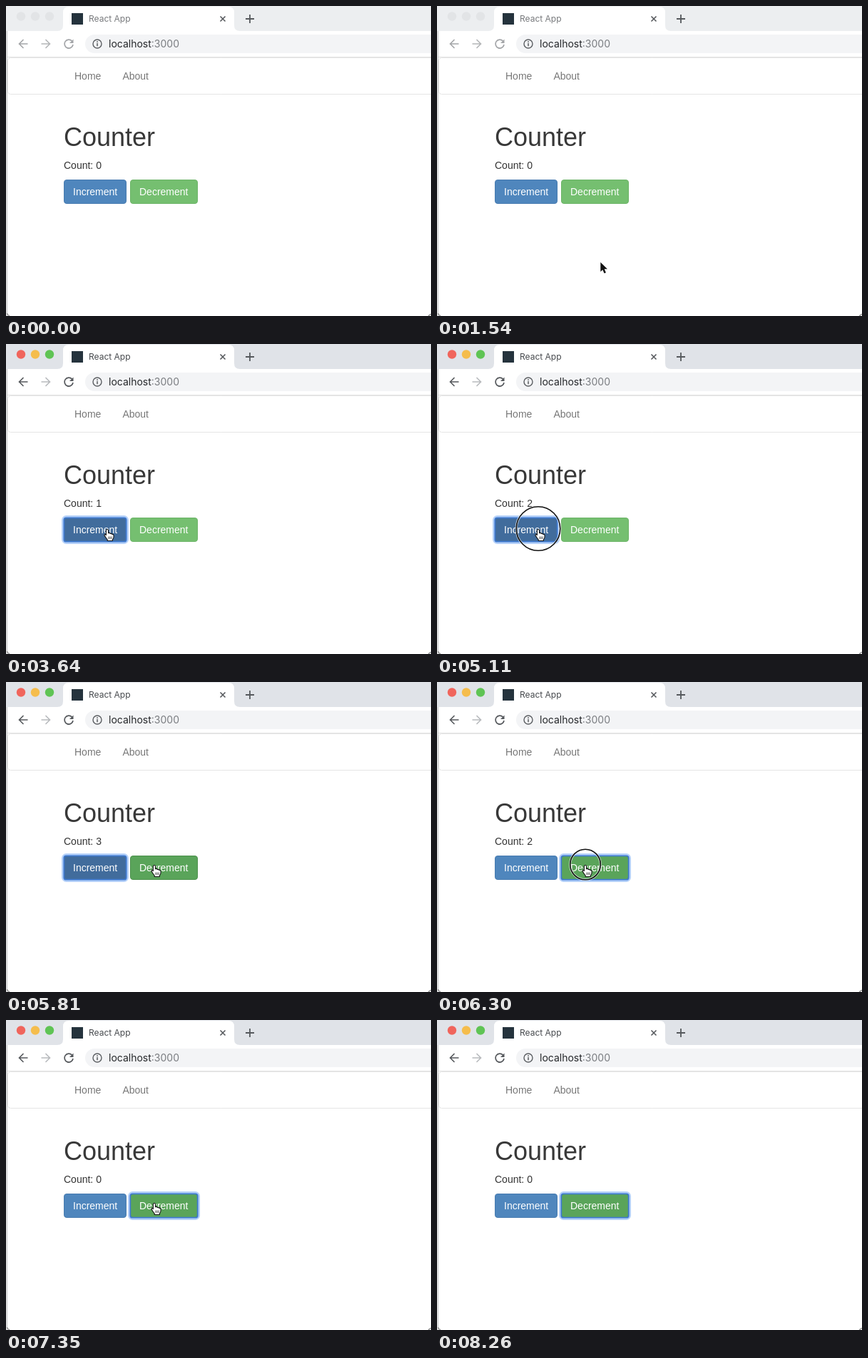
Recreate the animation shown at these times as an HTML page with a canvas. Size 596 px wide and 434 px high, loop 8.4 s.

```html
<!DOCTYPE html>
<html lang="en">
<head>
<meta charset="utf-8">
<title>Counter</title>
<style>
html, body { margin: 0; width: 100%; height: 100%; overflow: hidden; background: #fff; }
canvas { display: block; }
</style>
</head>
<body>
<canvas id="stage" width="596" height="434"></canvas>
<script>
const ctx = document.getElementById('stage').getContext('2d');
const LOOP = 8400, STEP = 70;
const UI = 'Inter, Roboto, sans-serif';
const PAGE = '"Liberation Sans", Arial, sans-serif';
const ACTIVATE = 2660;

// press and release times, and how each click changes the count
const clicks = [
  { down: 2660, up: 2800, add: 0 },
  { down: 3220, up: 3570, add: 1, on: 'inc' },
  { down: 4130, up: 4480, add: 1, on: 'inc' },
  { down: 5040, up: 5320, add: 1, on: 'inc' },
  { down: 5880, up: 6300, add: -1, on: 'dec' },
  { down: 6440, up: 6580, add: -1, on: 'dec' },
  { down: 6860, up: 7140, add: -1, on: 'dec' }
];

// pointer path: time, x, y
const track = [
  [1120, 286, 424], [2100, 142, 258.5], [5390, 142, 258.5], [5810, 208, 255.5],
  [7560, 208, 255.5], [7980, 265, 345], [8050, 265, 345], [8260, 287, 436]
];

const buttons = {
  inc: { x: 81, w: 88, label: 'Increment', base: '#4f86bd', edge: '#477bb0', dark: '#416c9c', darkEdge: '#365d8b' },
  dec: { x: 174, w: 95, label: 'Decrement', base: '#75bf70', edge: '#6bb466', dark: '#5aa45a', darkEdge: '#4b904b' }
};

const ease = u => u * u * (3 - 2 * u);

function pointer(t) {
  if (t < track[0][0] || t >= 8260) return null;
  const i = track.findIndex(k => k[0] > t);
  const [t0, x0, y0] = track[i - 1], [t1, x1, y1] = track[i];
  const u = ease((t - t0) / (t1 - t0));
  return { x: x0 + (x1 - x0) * u, y: y0 + (y1 - y0) * u };
}

function ringRadius(t) {
  const c = clicks.find(c => t >= c.down && t < c.up + STEP);
  if (!c) return 0;
  return t < c.down + STEP || t >= c.up ? 21.3 : 30.8;
}

function box(x, y, w, h, r, fill, stroke, lw = 1) {
  ctx.beginPath();
  ctx.roundRect(x, y, w, h, r);
  if (fill) { ctx.fillStyle = fill; ctx.fill(); }
  if (stroke) { ctx.strokeStyle = stroke; ctx.lineWidth = lw; ctx.stroke(); }
}

function disc(x, y, r, fill) {
  ctx.beginPath();
  ctx.arc(x, y, r, 0, 7);
  ctx.fillStyle = fill;
  ctx.fill();
}

function text(str, x, y, size, color, family = PAGE) {
  ctx.font = size + 'px ' + family;
  ctx.fillStyle = color;
  ctx.fillText(str, x, y);
}

function line(d, color, lw) {
  ctx.strokeStyle = color;
  ctx.lineWidth = lw;
  ctx.stroke(new Path2D(d));
}

function drawBrowser(active) {
  const strip = active ? '#e0e3e8' : '#eceef0';
  const icon = active ? '#55585c' : '#a3a5a8';
  ctx.fillStyle = '#fff';
  ctx.fillRect(0, 0, 596, 434);
  ctx.fillStyle = strip;
  ctx.fillRect(0, 0, 596, 35);
  const lights = active ? ['#f0655c', '#f5bd4c', '#5fc454'] : ['#e2e4e6', '#e2e4e6', '#e2e4e6'];
  lights.forEach((c, i) => disc(21 + 20 * i, 14.5, 6.2, c));

  ctx.fillStyle = '#fff';
  ctx.fill(new Path2D('M72 35Q80 35 80 27V9Q80 1 88 1H312Q320 1 320 9V27Q320 35 328 35Z'));
  ctx.fillStyle = '#25333d';
  ctx.fillRect(92, 10, 16, 16);
  text('React App', 116, 22, 12, active ? '#46494d' : '#77797c', UI);
  line('M300.5 14.5l7 7m0-7l-7 7', '#56595d', 1.6);
  line('M336 18h12m-6-6v12', '#56595d', 1.8);

  line('M30.5 53h-12m6-6l-6 6l6 6', icon, 1.6);
  line('M49.5 53h12m-6-6l6 6l-6 6', active ? '#b8babd' : '#b4b6b8', 1.6);
  line('M92.5 49A6 6 0 1 0 94 54', icon, 1.7);
  ctx.fillStyle = icon;
  ctx.fill(new Path2D('M94.5 46.5V52H89Z'));

  box(111, 40, 510, 26, 13, '#f3f4f6');
  ctx.beginPath();
  ctx.arc(128, 53, 6, 0, 7);
  ctx.strokeStyle = '#5b5e62';
  ctx.lineWidth = 1.4;
  ctx.stroke();
  line('M128 52v4.2M128 49.3v1.6', '#5b5e62', 1.5);
  text('localhost', 144, 58, 14, '#25272a', UI);
  text(':3000', 144 + ctx.measureText('localhost').width, 58, 14, '#7a7d81', UI);
}

function drawPage(count) {
  ctx.fillStyle = '#e2e2e2';
  ctx.fillRect(2, 71, 594, 1);
  box(2.5, 72.5, 620, 51, 4, null, '#e5e5e5');
  text('Home', 96, 103, 14, '#777');
  text('About', 163.4, 103, 14, '#777');
  text('Counter', 81, 196, 36, '#383838');
  text('Count: ' + count, 81, 228, 14, '#333');
}

function drawButton(b, dark, focus) {
  const { x, w } = b;
  if (focus) {
    box(x - 0.5, 242.5, w + 1, 35, 4, null, 'rgba(120,172,245,.55)', 5);
  }
  box(x + 0.5, 243.5, w - 1, 33, 3.5, dark ? b.dark : b.base, dark ? b.darkEdge : b.edge);
  if (focus) box(x + 0.3, 243.3, w - 0.6, 33.4, 3, null, '#3f7ad0', 1.8);
  text(b.label, x + 13, 265, 14, '#fff');
}

function drawFrame() {
  ctx.fillStyle = '#e9e9ea';
  ctx.fillRect(0, 35, 1, 399);
  ctx.fillStyle = '#c6c7c9';
  ctx.fillRect(1, 35, 1, 399);
  line('M1.5 430Q1.8 433 5 433.5', '#8b8b8b', 1.2);
  line('M595.5 431Q595 433 592 433.5', '#8b8b8b', 1.2);
}

function drawRing(p, r) {
  ctx.beginPath();
  ctx.arc(p.x, p.y, r, 0, 7);
  ctx.strokeStyle = 'rgba(255,255,255,.6)';
  ctx.lineWidth = 3.4;
  ctx.stroke();
  ctx.strokeStyle = '#111';
  ctx.lineWidth = 1.6;
  ctx.stroke();
}

const arrow = new Path2D('M0 0V13.2L3 10.4L5.2 15.4L7.6 14.4L5.4 9.5H9.6Z');
const hand = new Path2D('M-1.6 9V2.4Q-1.4 1 -.1 1Q1.3 1 1.5 2.4V6.2Q3.5 5.4 4.3 7Q6.2 6.4 6.8 7.9Q8.8 7.5 9 9.4V12Q8.6 14 7.4 15.2V17H.2V15.4Q-1.5 13.6 -2.6 11.5L-4 9.4Q-4.2 7.8 -2.8 7.9Z');

function drawPointer(p, isHand) {
  ctx.save();
  ctx.translate(p.x, p.y);
  ctx.lineJoin = 'round';
  if (isHand) {
    ctx.fillStyle = '#fff';
    ctx.fill(hand);
    ctx.strokeStyle = '#111';
    ctx.lineWidth = 1.1;
    ctx.stroke(hand);
    line('M2 11v3.5M4 11v3.5M6 11v3.5', '#222', 0.8);
  } else {
    ctx.strokeStyle = '#fff';
    ctx.lineWidth = 2.2;
    ctx.stroke(arrow);
    ctx.fillStyle = '#111';
    ctx.fill(arrow);
  }
  ctx.restore();
}

function render(t) {
  const active = t >= ACTIVATE;
  const p = pointer(t);
  const r = ringRadius(t);
  const count = clicks.reduce((n, c) => n + (t >= c.up ? c.add : 0), 0);
  const pressed = clicks.filter(c => c.on && t >= c.down).pop();
  const focus = active ? (pressed ? pressed.on : 'dec') : null;
  const live = p && t >= 2870;
  const over = b => live && p.x >= b.x && p.x <= b.x + b.w && p.y >= 243 && p.y <= 277;

  drawBrowser(active);
  drawPage(count);
  for (const id in buttons) {
    const b = buttons[id];
    drawButton(b, over(b) || focus === id, focus === id);
  }
  drawFrame();
  if (p) {
    if (r) drawRing(p, r);
    drawPointer(p, Object.values(buttons).some(over));
  }
}

const start = performance.now();
function tick() {
  const t = (performance.now() - start) % LOOP;
  render(Math.floor(t / STEP) * STEP);
  requestAnimationFrame(tick);
}
tick();
</script>
</body>
</html>
```
